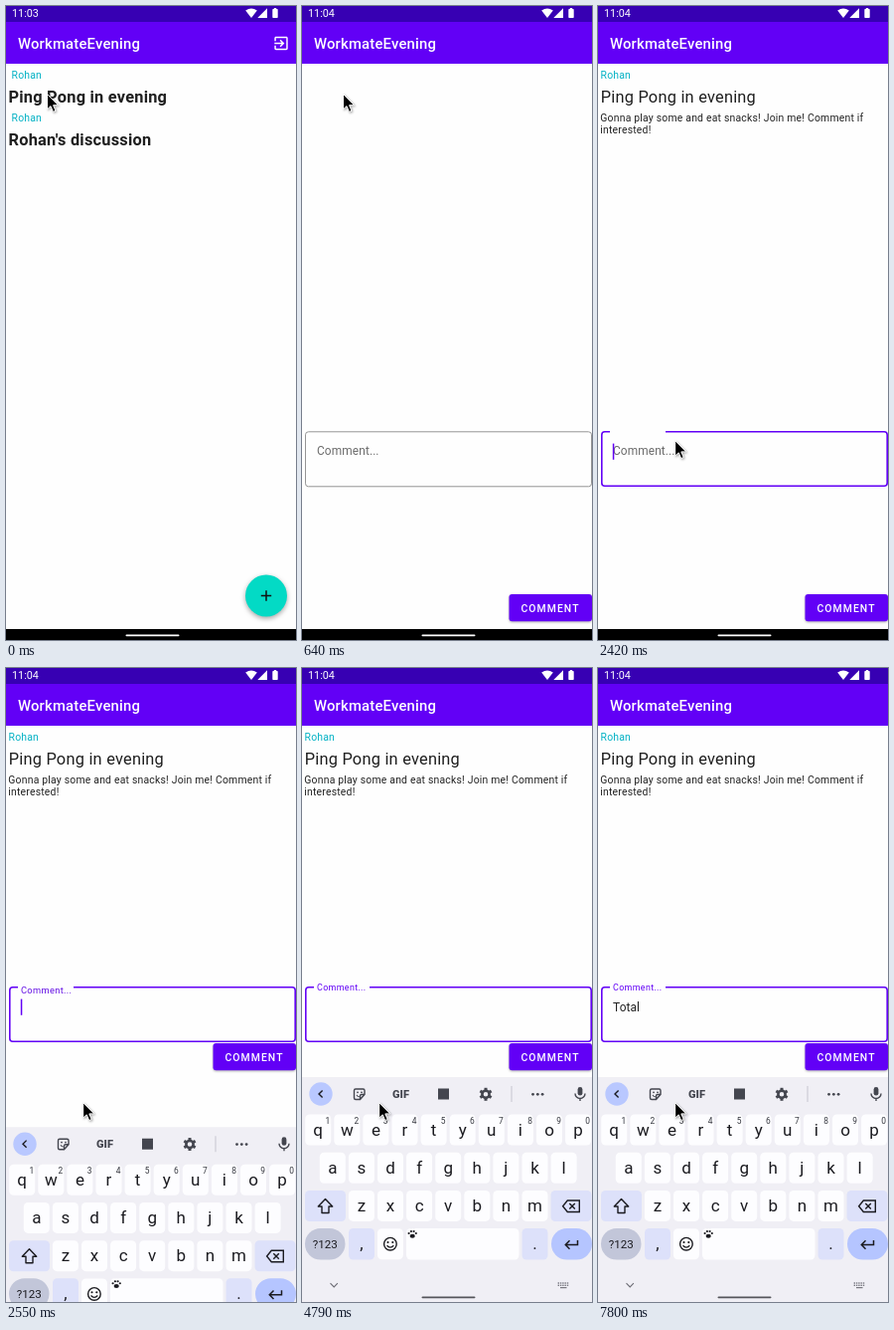
These frames come from a looping animation (292 px wide and 637 px high, 8 s). An HTML page:

```html
<!DOCTYPE html>
<html lang="en">
<head>
<meta charset="utf-8">
<title>Comment screen</title>
<style>
html, body { margin: 0; width: 100%; height: 100%; overflow: hidden; background: #fefefe; }
svg { display: block; width: 292px; height: 637px; font-family: Roboto, sans-serif; }
text { white-space: pre; }
.scaled { transform-origin: 146px 318.5px; }
.raised { filter: drop-shadow(0 1px 1px rgba(0,0,0,.3)); }
.time { font-size: 10.8px; fill: #fff; }
.bar { font-size: 14.87px; font-weight: 500; letter-spacing: .0125em; fill: #fff; }
.name { font-size: 10.41px; letter-spacing: .0178em; fill: #03b1c4; }
.head { font-size: 16.36px; letter-spacing: .014em; fill: #1f1f1f; }
.bold { font-weight: 700; }
.body { font-size: 10.41px; letter-spacing: .0195em; fill: #222; }
.input { font-size: 11.9px; letter-spacing: .009em; fill: #222; }
.button { font-size: 10.41px; font-weight: 500; letter-spacing: 1.08px; fill: #fff; }
.key { font-size: 17px; text-anchor: middle; fill: #1b1b20; }
.digit { font-size: 8.4px; text-anchor: middle; fill: #33353d; }
</style>
</head>
<body>
<svg id="stage" viewBox="0 0 292 637"></svg>
<script>
const LOOP = 8000, PURPLE = '#6200f6';
const text = (x, y, cls, s, id = '') => `<text x="${x}" y="${y}" class="${cls}" id="${id}">${s}</text>`;
const rect = (x, y, w, h, fill, r = 0) => `<rect x="${x}" y="${y}" width="${w}" height="${h}" rx="${r}" fill="${fill}"/>`;
const disc = (x, y, r, fill) => `<circle cx="${x}" cy="${y}" r="${r}" fill="${fill}"/>`;
const line = (d, color, w = 1.4) => `<path d="${d}" fill="none" stroke="${color}" stroke-width="${w}"/>`;
const shape = (d, fill) => `<path d="${d}" fill="${fill}"/>`;

const APP = 'WorkmateEvening', HOST = 'Rohan', TOPIC = 'Ping Pong in evening';

// Bleeds past the top and right edges so they stay covered while scaled
const chrome = rect(0, 0, 300, 637, '#fefefe') + rect(0, -8, 300, 24, '#3700b3') +
  rect(0, 16, 300, 42, PURPLE) + text(11.9, 43, 'bar', APP) + rect(0, 626, 300, 11, '#000');

function listPage() {
  const exit = 'M10.09 15.59L11.5 17l5-5-5-5-1.41 1.41L12.67 11H3v2h9.67zM19 3H5c-1.1 0-2 .9-2 2v4h2V5h14v14H5v-4H3v4c0 1.1.9 2 2 2h14c1.1 0 2-.9 2-2V5c0-1.1-.9-2-2-2z';
  return chrome +
    `<g transform="translate(268.1 28.6) scale(.7436)">${shape(exit, '#fff')}</g>` +
    text(5.6, 73, 'name', HOST) + text(2.5, 96.6, 'head bold', TOPIC) +
    text(5.6, 116, 'name', HOST) + text(2.5, 139.6, 'head bold', HOST + "'s discussion") +
    `<g style="filter:drop-shadow(0 2.5px 2.5px rgba(0,0,0,.35))">${disc(262, 592.5, 21, '#03dac5')}</g>` +
    line('M256.8 592.5h10.4M262 587.3v10.4', '#111', 1.5);
}

function postPage() {
  return chrome +
    `<g id="post">${text(2.6, 73, 'name', HOST)}${text(2.7, 96.6, 'head', TOPIC)}` +
    text(2.3, 115.6, 'body', 'Gonna play some and eat snacks! Join me! Comment if') +
    text(2.3, 128.2, 'body', 'interested!') + '</g>' +
    `<g id="field">
      <rect id="idle" x="3.5" y=".8" width="288" height="55" rx="3" fill="none" stroke="#959595"/>
      <g id="active">${line('M12 .8H6.8Q3.8 .8 3.8 3.8V52.2Q3.8 55.2 6.8 55.2H288.2Q291.2 55.2 291.2 52.2V3.8Q291.2 .8 288.2 .8H68', PURPLE, 1.6)}</g>` +
    text(15, 24.4, 'input', 'Comment...', 'hint') + text(15, 25.2, 'input', '', 'typed') +
    `<rect id="caret" y="12.6" width="1.5" height="16.2" fill="${PURPLE}"/></g>` +
    `<g id="send"><g class="raised">${rect(208.5, 591, 83.5, 27.3, PURPLE, 3)}</g>${text(220.4, 608.8, 'button', 'COMMENT')}</g>`;
}

function gear(x, y) {
  let s = `<circle cx="${x}" cy="${y}" r="3.6" fill="none" stroke="#44464f" stroke-width="2.6"/>`;
  for (let a = 0; a < 360; a += 60)
    s += `<rect x="${x - 1.5}" y="${y - 6.5}" width="3" height="3" fill="#44464f" transform="rotate(${a} ${x} ${y})"/>`;
  return s;
}

function toolbar() {
  const ink = '#44464f';
  return disc(19, 428, 11.7, '#b9c8ff') + line('M20.6 424.4L17 428l3.6 3.6', '#1b1b20') +
    line('M63 428.5V424.5q0-1.5-1.5-1.5H54q-1.5 0-1.5 1.5V432q0 1.5 1.5 1.5H58.5zM58.5 433.5V430q0-1.5 1.5-1.5H63', ink) +
    disc(56, 426.3, .9, ink) + disc(60, 426.3, .9, ink) + line('M55 429q1 1.8 2.8 1.8', ink, 1.1) +
    `<text x="99.5" y="432" text-anchor="middle" font-size="11" font-weight="900" fill="${ink}">GIF</text>` +
    rect(137, 422.5, 11, 11, ink) + gear(185, 428.3) + rect(210.5, 420, 1, 16, '#c6c6d0') +
    [232.5, 237.3, 242.1].map(x => disc(x, 428.3, 1.4, ink)).join('') +
    rect(277.6, 421, 4.8, 8.6, ink, 2.4) + line('M275 427.5a5 5 0 0 0 10 0M280 432.3V435', ink);
}

function keyboard() {
  const soft = '#dde1fa', ink = '#1b1b20', cap = (x, y, s) =>
    rect(x - 13, y - 15.5, 26, 31, '#fdfdff', 4.5) + text(x, y + 5.6, 'key', s);
  let s = rect(0, 411, 292, 226, '#f0eff5') + toolbar();
  ['qwertyuiop', 'asdfghjkl', 'zxcvbnm'].forEach((row, r) =>
    [...row].forEach((c, i) => {
      const x = [16.2, 30.8, 59.9][r] + i * 29.1;
      s += cap(x, 464 + r * 38.2, c);
      if (!r) s += text(x + 9.6, 458, 'digit', (i + 1) % 10);
    }));
  s += rect(3, 525, 41, 31, soft, 4.5) +
    `<path d="M23.5 533.5l7.2 7.5H27V547.5H20V541H16.3z" fill="none" stroke="${ink}" stroke-width="1.4" stroke-linejoin="round"/>`;
  s += rect(250.5, 525, 41, 31, soft, 4.5) +
    line('M267.3 535H279.3V546.5H267.3L262.6 540.75zM269.3 538l5.5 5.5M274.8 538l-5.5 5.5', ink);
  s += rect(3, 563, 40.5, 31.5, '#c2c6d9', 15.7) +
    `<text x="23.2" y="583" text-anchor="middle" font-size="11.6" fill="${ink}">?123</text>`;
  s += rect(47, 563, 26, 31.5, soft, 4.5) + text(60, 584, 'key', ',') + cap(88.9, 578.7, '') +
    `<circle cx="88.9" cy="578.7" r="6.3" fill="none" stroke="${ink}" stroke-width="1.4"/>` +
    disc(86.5, 577, 1.1, ink) + disc(91.3, 577, 1.1, ink) + line('M85.5 580.3q3.4 3.8 6.8 0', ink, 1.3);
  s += rect(105, 563, 113.5, 31.5, '#fdfdff', 4.5) + `<ellipse cx="111.2" cy="570.8" rx="2.6" ry="2" fill="${ink}"/>` +
    [[107.6, 568], [109.9, 566], [112.6, 566], [114.8, 568]].map(([x, y]) => disc(x, y, 1.1, ink)).join('');
  s += rect(221.5, 563, 26, 31.5, soft, 4.5) + text(234.5, 584, 'key', '.') +
    rect(251, 563, 41, 31.5, '#b5c5ff', 15.7) +
    line('M277.5 575V579.5H265.5M269.5 575.3l-4.2 4.2 4.2 4.2', ink, 1.5);
  s += `<g id="navIcons">${line('M28.5 618.2l3.7 3.7 3.7-3.7', '#6c6c74', 1.1)}`;
  for (let i = 0; i < 10; i++) s += rect(257.6 + (i % 5) * 2.3, 617.3 + (i > 4) * 2.3, 1.4, 1.4, '#77777f');
  return s + rect(260, 622, 6.5, 1.2, '#77777f') + rect(120.5, 631.4, 54, 1.8, '#55555b', .9) + '</g>';
}

const status = text(6, 11.3, 'time', '11:03', 'clock') +
  shape('M247 12L241.2 4.6Q247 .2 252.8 4.6z', '#fff') + shape('M263 2.3V12H253.3z', '#fff') +
  rect(268.3, 3, 5.4, 9, '#fff', .7) + rect(269.8, 2, 2.4, 1.5, '#fff');

document.getElementById('stage').innerHTML =
  `<g id="list" class="scaled">${listPage()}</g>` +
  `<rect id="dim" width="292" height="637"/>` +
  `<g id="page" class="scaled">${postPage()}</g>` + status +
  `<g id="pill">${rect(120.5, 631.4, 54, 1.8, '#fff', .9)}</g>` +
  `<g id="keys">${keyboard()}</g>` +
  `<g id="mouse" style="filter:drop-shadow(1px 1px 1px rgba(0,0,0,.35))">
    <path d="M0 0V15.3L3.5 12.1 6 17.9 8.5 16.8 6.1 11.2H11z" fill="#000" stroke="#fff" stroke-width="1" stroke-linejoin="round"/></g>`;

const el = {};
for (const node of document.querySelectorAll('[id]')) if (node.id) el[node.id] = node;

// Time, page scale, page opacity, list scale, dim
const ENTER = [[0, 1, 0, 1, 0], [20, .88, .3, 1.01, .08], [50, .925, .75, 1.025, .16],
  [80, .965, 1, 1.042, .24], [110, .988, 1, 1.057, .3], [320, .996, 1, 1.08, .3], [340, 1, 1, 1.1, 0]];
const MOUSE = [[1410, 41.5, 88.5], [1610, 59.5, 108], [1800, 75, 215], [1980, 81, 350], [2080, 80, 415], [2160, 77.7, 436.7]];
const TYPED = [[0, ''], [6390, 'T'], [6540, 'To'], [6990, 'Tot'], [7110, 'Tota'], [7290, 'Total']];
const CARET = [[0, 0], [2360, 1], [2760, 0], [3250, 1], [3750, 0], [4290, 1], [4790, 0], [5300, 1], [5770, 0], [6310, 1], [7800, 0]];

const at = (table, t) => table.findLast(row => row[0] <= t);
const ramp = (t, a, b) => Math.min(1, Math.max(0, (t - a) / (b - a)));
const mix = (a, b, k) => a + (b - a) * k;
const smooth = k => k * k * (3 - 2 * k);
const show = (node, on) => node.setAttribute('visibility', on ? 'visible' : 'hidden');
const move = (node, x, y) => node.setAttribute('transform', `translate(${x} ${y})`);

function along(path, t) {
  const i = Math.max(1, path.findIndex(p => p[0] >= t));
  const [a, b] = t >= path.at(-1)[0] ? path.slice(-2) : [path[i - 1], path[i]];
  const k = ramp(t, a[0], b[0]);
  return [mix(a[1], b[1], k), mix(a[2], b[2], k)];
}

function draw(t) {
  const [, scale, alpha, back, dim] = at(ENTER, t);
  el.page.style.transform = `scale(${scale})`;
  el.page.style.opacity = alpha;
  el.list.style.transform = `scale(${back})`;
  el.dim.style.opacity = dim;
  el.pill.style.opacity = 1 - dim;
  el.clock.textContent = t < 640 ? '11:03' : '11:04';
  show(el.post, t >= 820);
  move(el.mouse, ...along(MOUSE, t));

  const focused = t >= 2360, raised = t >= 2470;
  show(el.idle, !focused);
  show(el.active, focused);
  move(el.field, 0, raised ? 320 : 427);
  move(el.send, 0, raised ? -214 : 0);

  const k = smooth(ramp(t, 2420, 2590));
  el.hint.setAttribute('y', mix(24.4, 4.1, k));
  el.hint.style.fontSize = mix(11.9, 8.92, k) + 'px';
  el.hint.style.letterSpacing = mix(.009, .038, k) + 'em';
  el.hint.style.fill = `rgb(${mix(108, 98, k)},${mix(108, 0, k)},${mix(108, 246, k)})`;

  const word = at(TYPED, t)[1];
  el.typed.textContent = word;
  el.caret.setAttribute('x', 14.8 + (word ? el.typed.getComputedTextLength() : 0));
  show(el.caret, at(CARET, t)[1]);

  const up = 1 - (1 - ramp(t, 2440, 2650)) ** 2;
  show(el.keys, up > 0);
  move(el.keys, 0, 226 * (1 - up));
  el.navIcons.style.opacity = mix(.12, 1, ramp(t, 2660, 3080));
}

const start = performance.now();
function tick() {
  draw((performance.now() - start) % LOOP);
  requestAnimationFrame(tick);
}
tick();
</script>
</body>
</html>
```
